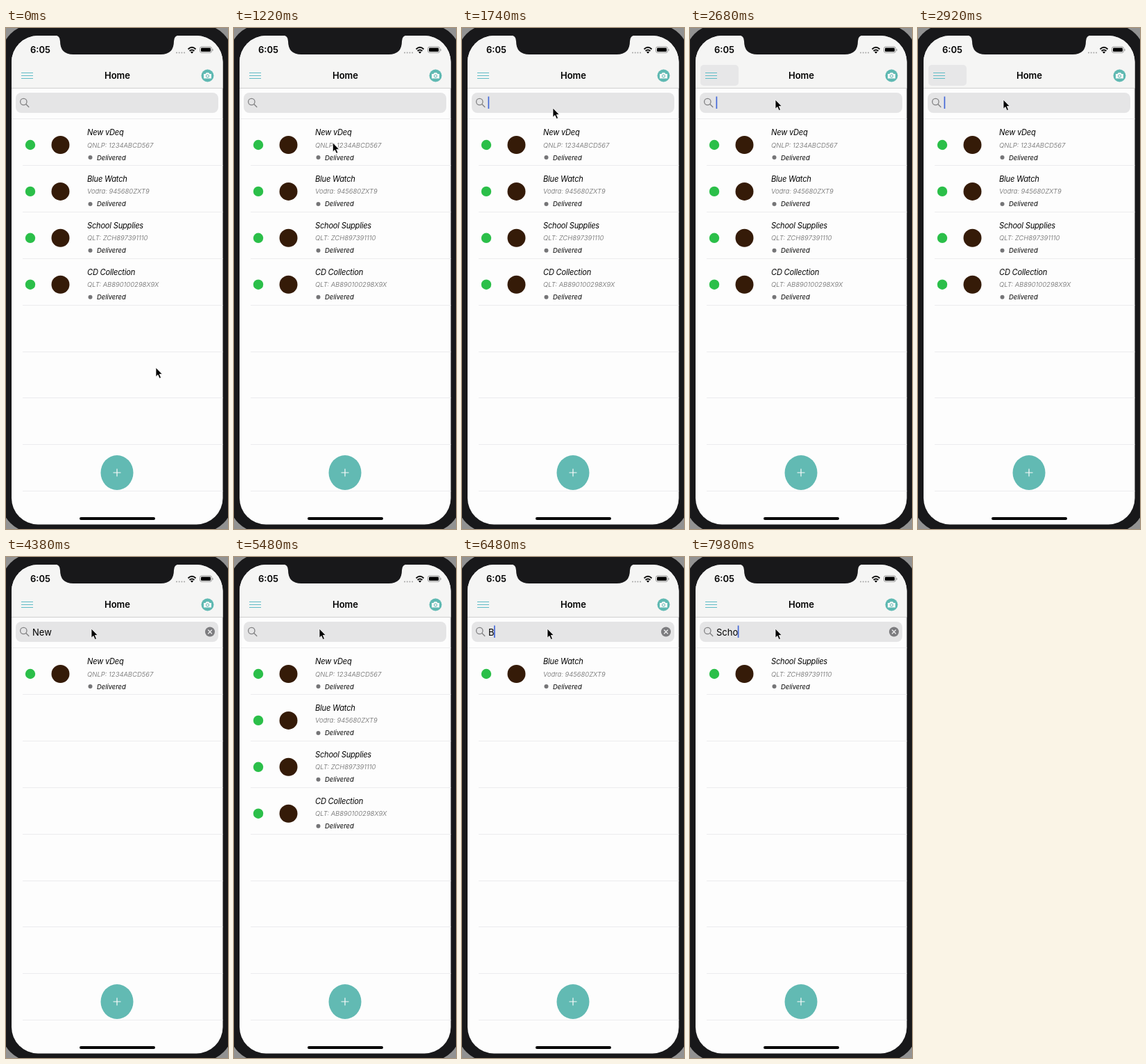
An HTML page for the animation above (8000 ms loop, 320x720 px).

```html
<!DOCTYPE html>
<html lang="en">
<head>
<meta charset="utf-8">
<title>Parcel search</title>
<style>
  html, body { margin: 0; width: 100%; height: 100%; overflow: hidden; background: #929292; }
  svg { display: block; width: 320px; height: 720px; font-family: Inter, Roboto, sans-serif; }
  .bold { font-size: 13px; font-weight: 600; }
  .row { font-style: italic; }
  .name { font-size: 11.1px; letter-spacing: -.2px; }
  .track { font-size: 9.5px; font-weight: 300; fill: #666; }
  .state { font-size: 9.4px; }
  .line { fill: none; stroke-linecap: round; }
</style>
</head>
<body>
<svg viewBox="0 0 320 720">
  <rect x="-7" y="-5" width="334" height="730" rx="46" fill="#18181a"/>
  <clipPath id="screen"><rect x="8" y="11" width="304.5" height="702.5" rx="38"/></clipPath>
  <g clip-path="url(#screen)">
    <rect width="320" height="720" fill="#fdfdfd"/>
    <rect width="320" height="86" fill="#f5f5f4"/>
    <path d="M8 86.5H313" stroke="#d0d0d0"/>
    <path id="separators" stroke="#ececee"/>
  </g>
  <path d="M70 10Q78 11 78 19Q78 38 97 38H223Q242 38 242 19Q242 11 250 10Z" fill="#18181a"/>

  <text class="bold" x="35" y="36">6:05</text>
  <path class="line" d="M246 35.5h12" stroke="#a5a5a5" stroke-width="2" stroke-dasharray="0 3.7"/>
  <path d="M262.5 30.5Q268 25.2 273.5 30.5M264.6 33Q268 29.8 271.4 33" fill="none" stroke="#111" stroke-width="1.9"/>
  <path d="M265.9 34.6Q268 32.9 270.1 34.6L268 36.8Z"/>
  <rect x="279.5" y="27" width="17" height="8.5" rx="2.5" fill="none" stroke="#999"/>
  <rect x="281" y="28.5" width="14" height="5.5" rx="1.3"/>
  <path d="M298 30v3" stroke="#999"/>

  <rect id="highlight" x="15" y="53" width="55" height="30" rx="5" fill="#e7e7e8"/>
  <path d="M22 64.5h17M22 68.5h17M22 72.5h17" stroke="#5fbcc6"/>
  <text class="bold" x="160.5" y="73" text-anchor="middle">Home</text>
  <circle cx="290.5" cy="68.5" r="9" fill="#5fb9b2"/>
  <path d="M285 66h2.5l1.2-1.7h3.6l1.2 1.7h2.5v6.5h-11Z" fill="#f8f8f8"/>
  <circle cx="290.5" cy="69" r="2" fill="none" stroke="#5fb9b2"/>

  <rect x="14" y="93" width="292" height="29" rx="8" fill="#e5e5e6"/>
  <g class="line" stroke="#828284" stroke-width="1.3">
    <circle cx="25.3" cy="106" r="4.7"/><path d="M28.8 109.5l4 4"/>
  </g>
  <text id="query" x="38" y="112.5" font-size="13"></text>
  <rect id="caret" y="98.5" width="1.7" height="17.5" fill="#4468d8"/>
  <g id="clear">
    <circle cx="294" cy="107.5" r="7" fill="#7c7c7f"/>
    <path class="line" d="M291.5 105l5 5m0-5l-5 5" stroke="#ececec" stroke-width="1.3"/>
  </g>

  <g id="list"></g>
  <ellipse cx="160" cy="639" rx="23.5" ry="25" fill="#62bab3"/>
  <path d="M154.5 639h11M160 633.5v11" stroke="#fafafa" stroke-width="1.2"/>
  <rect x="106" y="703" width="109" height="4" rx="2"/>
  <path id="pointer" d="M0 0V13.2L3 10.5L5.2 15.5L7.5 14.5L5.3 9.6H9.3Z" stroke="#fff" stroke-width=".8"/>
</svg>
<script>
const LOOP = 8000, ROW = 66.9, FOCUS = 1500;
const parcels = [
  ["New vDeq", "QNLP: 1234ABCD567"],
  ["Blue Watch", "Vodra: 945680ZXT9"],
  ["School Supplies", "QLT: ZCH897391110"],
  ["CD Collection", "QLT: AB890100298X9X"]
];
const edits = [
  [0, ""], [FOCUS, ""], [3040, "N"], [3480, "Ne"], [3720, "New"],
  [4700, "Ne"], [4840, "N"], [4970, ""], [6120, "B"], [6880, ""],
  [7200, "S"], [7480, "Sc"], [7680, "Sch"], [7860, "Scho"]
];
const path = [[0, 216, 488], [350, 216, 488], [1480, 131, 115], [1760, 131, 115], [2150, 123, 103], [LOOP, 123, 103]];
const el = id => document.getElementById(id);
const show = (id, on) => el(id).setAttribute("visibility", on ? "visible" : "hidden");

el("separators").setAttribute("d", Array.from({ length: 9 }, (_, i) =>
  `M${i ? 24 : 8} ${Math.round(130 + i * ROW) + .5}H313`).join(""));

el("list").innerHTML = parcels.map(([name, track]) => `<g class="row">
  <circle cx="35" cy="168" r="7.2" fill="#2bbf49"/>
  <circle cx="78.5" cy="168" r="13" fill="#351b08"/>
  <text class="name" x="117" y="154">${name}</text>
  <text class="track" x="117" y="171.5">${track}</text>
  <circle cx="121.5" cy="186" r="3" fill="#757577"/>
  <text class="state" x="131" y="189.5">Delivered</text></g>`).join("");
const rows = [...el("list").children];

function filterRows(query) {
  let slot = 0;
  parcels.forEach(([name], i) => {
    const match = name.toLowerCase().includes(query.toLowerCase());
    rows[i].style.display = match ? "" : "none";
    if (match) rows[i].setAttribute("transform", `translate(0 ${slot++ * ROW})`);
  });
}

function pointerAt(t) {
  const i = path.findIndex(p => p[0] > t);
  const [t0, x0, y0] = path[i - 1], [t1, x1, y1] = path[i];
  const u = (t - t0) / (t1 - t0), k = u * u * (3 - 2 * u);
  return `translate(${x0 + (x1 - x0) * k} ${y0 + (y1 - y0) * k})`;
}

function draw(now) {
  const t = now % LOOP;
  const [since, query] = edits.filter(e => e[0] <= t).pop();
  el("query").textContent = query;
  filterRows(query);
  el("caret").setAttribute("x", 37.5 + (query && el("query").getComputedTextLength()));
  show("caret", t >= FOCUS && (t - since) % 1000 < 500);
  show("clear", query);
  show("highlight", t >= 2600 && t < 2960);
  el("pointer").setAttribute("transform", pointerAt(t));
  requestAnimationFrame(draw);
}
requestAnimationFrame(draw);
</script>
</body>
</html>
```
